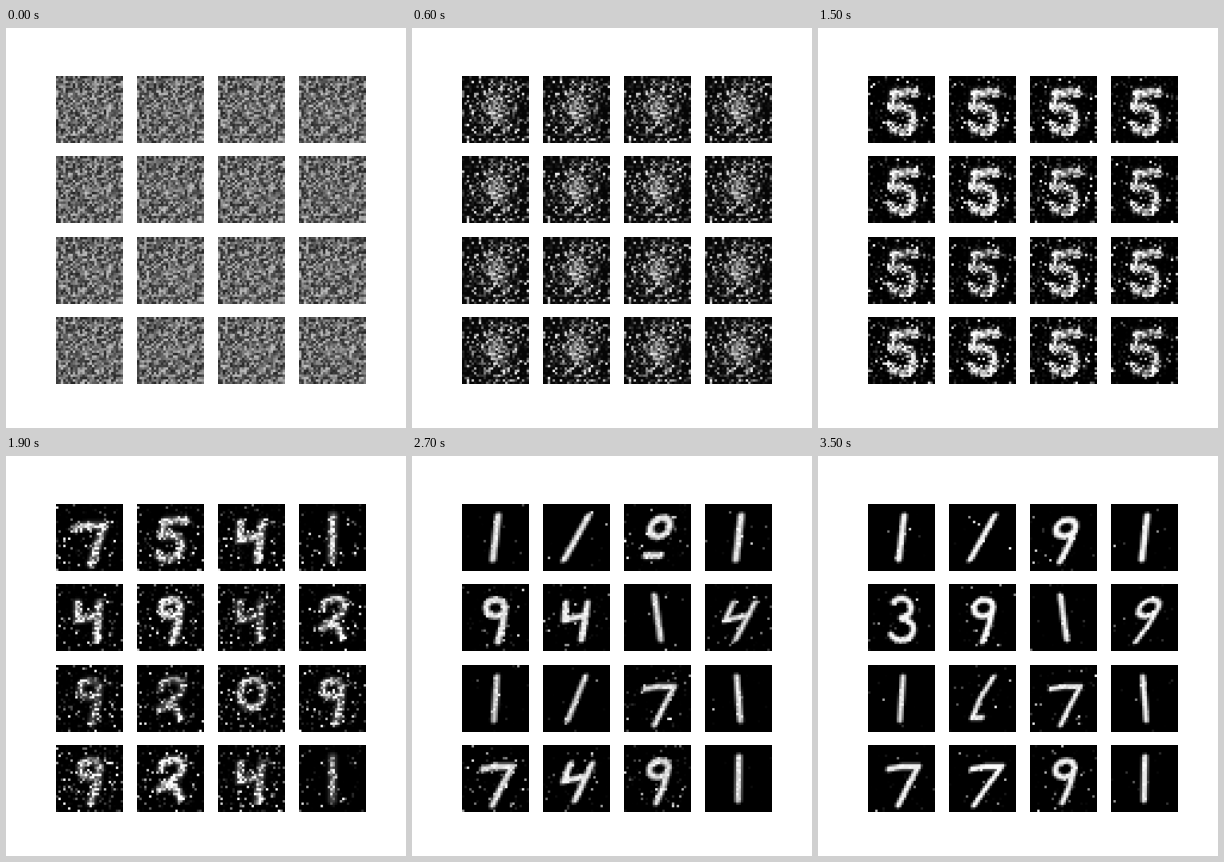
These frames come from a looping animation (400x400 px, 3600 ms). An HTML page with a canvas:

```html
<!DOCTYPE html>
<html lang="en">
<head>
<meta charset="utf-8">
<title>Digits emerging from noise</title>
<style>
html, body { margin: 0; width: 100%; height: 100%; overflow: hidden; background: #fff; }
canvas { display: block; width: 400px; height: 400px; }
</style>
</head>
<body>
<canvas id="stage" width="400" height="400"></canvas>
<script>
const N = 28, STEP = 100, STEPS = 36;
const ctx = document.getElementById('stage').getContext('2d');

function buffer(size) {
  const c = document.createElement('canvas');
  c.width = c.height = size;
  return c;
}
const small = buffer(N), twice = buffer(N * 2);
const sctx = small.getContext('2d'), tctx = twice.getContext('2d');
tctx.imageSmoothingEnabled = false;
const img = sctx.createImageData(N, N);

const lerp = (a, b, t) => a + (b - a) * t;
const clamp = v => Math.max(0, Math.min(1, v));

function hash(a, b) {
  let h = Math.imul(a + 1, 374761393) ^ Math.imul(b + 7, 668265263);
  h = Math.imul(h ^ (h >>> 13), 1274126177);
  h = Math.imul(h ^ (h >>> 15), 2246822519);
  return ((h ^ (h >>> 16)) >>> 0) / 4294967296;
}

// Fold any number back into 0..1
function fold(v) {
  v = Math.abs(v) % 2;
  return v > 1 ? 2 - v : v;
}

function path(...n) {
  const pts = [];
  for (let i = 0; i < n.length; i += 2) pts.push([n[i], n[i + 1]]);
  return pts;
}

// Angles in half turns
function arc(cx, cy, rx, ry, from = 0, to = 2) {
  return Array.from({ length: 13 }, (_, i) => {
    const a = lerp(from, to, i / 12) * Math.PI;
    return [cx + Math.cos(a) * rx, cy + Math.sin(a) * ry];
  });
}

// Strokes of each digit, in cells from the tile centre
const digits = {
  0: [arc(0, -2, 5, 6)],
  1: [path(0, -9, 0, 9)],
  2: [arc(0, -4, 4.5, 4, -1, 0.25), path(3, -1, -4, 4, 2, 3, 5, 8)],
  3: [arc(0, -4, 4, 4, -0.8, 0.5), arc(0, 5, 5, 4.5, -0.5, 0.85)],
  4: [path(-5, -6, -5, 1, 4, -1), path(4, -6, 3, 9)],
  5: [path(5, -7, -3, -7, -4, -1), arc(0, 4, 5, 5, -0.6, 0.8)],
  6: [path(1, -9, -1, 0, -1, 8, 3, 8)],
  7: [path(-6, -4, -1, -5, 6, -5, 3, 4, 1, 11)],
  8: [arc(0, -4.3, 4, 4), path(-3, 7.5, 3, 7.5)],
  9: [arc(0, -4, 4, 3.5), path(4, -4, 3, 3, 1, 10)]
};

const lean = [0.12, 0.55, 0.25, 0.12, 0, 0.1, -0.14, 0.45, 0.07, 0.4, 0.2, -0.08, 0.2, 0.4, 0.15, 0.02];

function dist(x, y, a, b) {
  const dx = b[0] - a[0], dy = b[1] - a[1];
  const t = clamp(((x - a[0]) * dx + (y - a[1]) * dy) / (dx * dx + dy * dy));
  return Math.hypot(x - a[0] - dx * t, y - a[1] - dy * t);
}

// Fills a 28 x 28 map with shape(x, y), measured from the tile centre
function grid(shape) {
  return Float32Array.from({ length: N * N }, (_, i) =>
    shape(i % N - 13.5, Math.floor(i / N) - 13.5));
}

const blob = (cx, cy, sx, sy) =>
  grid((x, y) => Math.exp(-(((x - cx) / sx) ** 2 + ((y - cy) / sy) ** 2) / 2));

function strokes(lines, slant, w, soft) {
  return grid((x, y) => {
    let d = 99;
    for (const l of lines)
      for (let k = 1; k < l.length; k++) d = Math.min(d, dist(x + y * slant, y, l[k - 1], l[k]));
    return clamp((w - d) / soft + 0.5);
  });
}

// One map and one ground exponent per tile; a "1" has the cleanest ground
function row(names, tilt, w, soft, spread, clean, dirty) {
  return [...names].map((name, i) => {
    const amp = 1 - spread * hash(i, 90);
    return {
      map: strokes(digits[name], lean[i] * tilt, w + 0.3 * hash(i, 91), soft).map(v => v * amp),
      ground: Math.log((name === '1' ? clean : dirty) * (0.7 + 0.6 * hash(i, 92)))
    };
  });
}

const shared = (map, ground) => Array(16).fill({ map, ground: Math.log(ground) });

// ink: exponent inside shapes, solid: how filled they are, vary: tile differences
const stages = [
  { at: 0, tiles: shared(blob(2, 2, 8, 8), 1.7), ink: 0.8, solid: 0, vary: 0.4, lo: 0.14, hi: 0.76 },
  { at: 6, tiles: shared(blob(0.5, 0, 5.5, 8), 9), ink: 0.75, solid: 0, vary: 0.18, lo: 0.02, hi: 0.95 },
  { at: 11, tiles: shared(strokes([arc(0, -1.5, 3, 5.5)], 0.1, 1.9, 4), 14), ink: 0.3, solid: 0, vary: 0.14, lo: 0, hi: 1.1 },
  { at: 15, tiles: row('5555555555555555', 0, 1.6, 3, 0.2, 16, 16), ink: 0.2, solid: 0.15, vary: 0.16, lo: 0, hi: 1.15 },
  { at: 19, tiles: row('7541494292099241', 0.25, 1.4, 2.3, 0.35, 40, 22), ink: 0.2, solid: 0.35, vary: 0.3, lo: 0, hi: 1.15 },
  { at: 27, tiles: row('1181941411717491', 1, 1.1, 1.5, 0.12, 350, 60), ink: 0.12, solid: 0.92, vary: 0.6, lo: 0, hi: 1 },
  { at: 35, tiles: row('1191391916717791', 1, 1.0, 1.3, 0.1, 350, 120), ink: 0.08, solid: 1, vary: 0.8, lo: 0, hi: 1 }
];

function drawTile(k, tile) {
  const n = Math.max(0, stages.findIndex(s => s.at >= k) - 1);
  const a = stages[n], b = stages[n + 1];
  const t = (k - a.at) / (b.at - a.at);
  const mix = key => lerp(a[key], b[key], t);
  const from = a.tiles[tile], to = b.tiles[tile];
  const ground = lerp(from.ground, to.ground, t), ink = Math.log(mix('ink'));
  const solid = mix('solid'), vary = mix('vary'), lo = mix('lo'), hi = mix('hi');
  for (let i = 0; i < N * N; i++) {
    const d = lerp(from.map[i], to.map[i], t);
    const s = fold(hash(i, 50) + k * 0.08 * (hash(i, 51) - 0.5) + vary * (hash(i, tile) - 0.5));
    const v = Math.max(s ** Math.exp(lerp(ground, ink, d)), solid * d);
    img.data.fill(255 * clamp(lerp(lo, hi, v)), i * 4, i * 4 + 3);
    img.data[i * 4 + 3] = 255;
  }
  sctx.putImageData(img, 0, 0);
  // Doubling first keeps cells square with slightly soft edges
  tctx.drawImage(small, 0, 0, N * 2, N * 2);
  const col = tile % 4, line = Math.floor(tile / 4);
  ctx.drawImage(twice, 50 + 81 * col, 48 + Math.round(80.4 * line), 67, 67);
}

function draw(k) {
  ctx.fillStyle = '#fff';
  ctx.fillRect(0, 0, 400, 400);
  for (let tile = 0; tile < 16; tile++) drawTile(k, tile);
}

let shown = -1;
const start = performance.now();
function tick() {
  const k = Math.floor((performance.now() - start) / STEP) % STEPS;
  if (k !== shown) draw(shown = k);
  requestAnimationFrame(tick);
}
tick();
</script>
</body>
</html>
```
